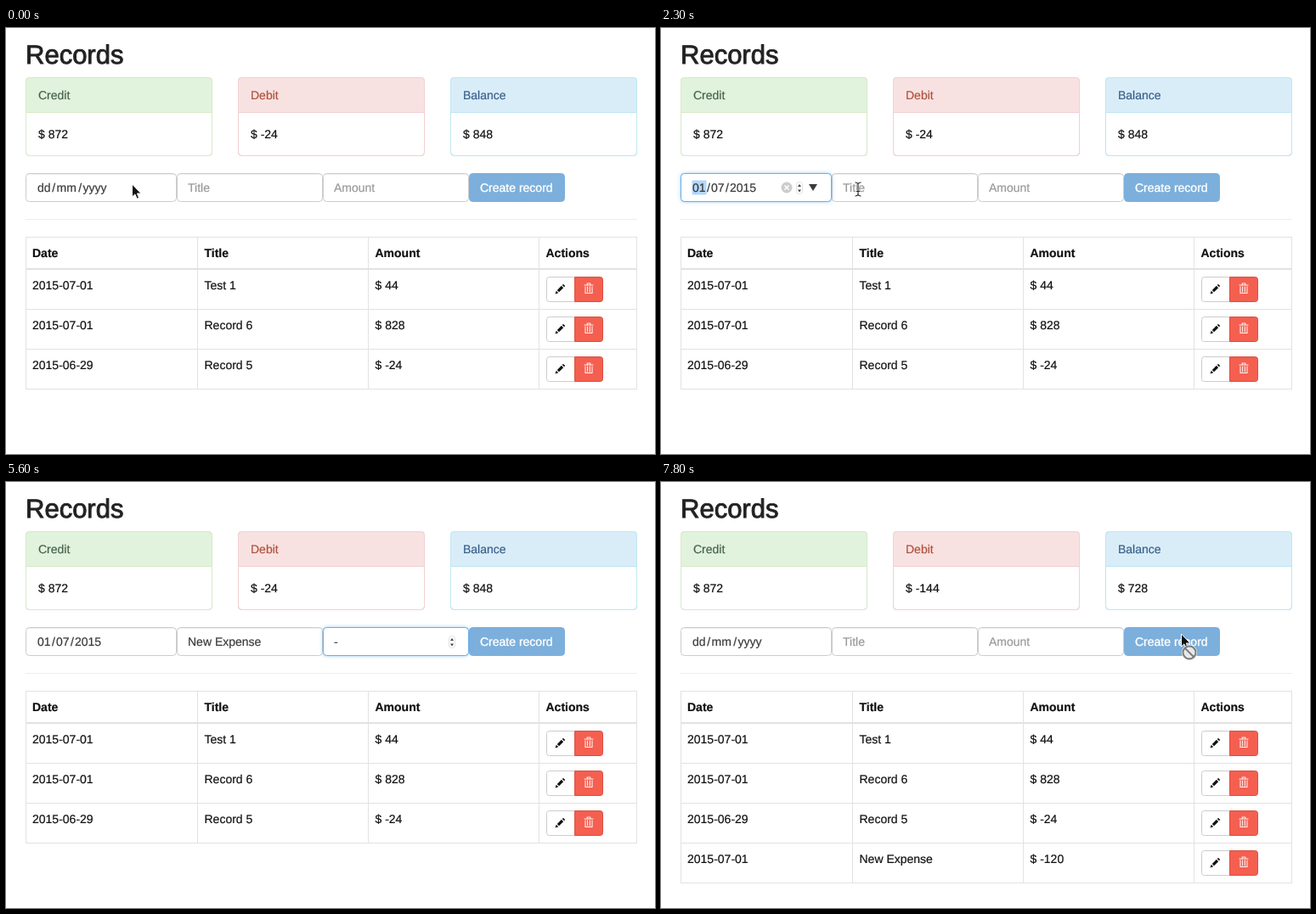
An HTML page that plays this animation: 764x502 px, repeating every 8000 ms.

```html
<!DOCTYPE html>
<html lang="en">
<head>
<meta charset="utf-8">
<title>Records</title>
<style>
  html, body { margin: 0; width: 100%; height: 100%; overflow: hidden; background: #fff; }
  svg { display: block; width: 764px; height: 502px; font: 14px "Liberation Sans", Arial, sans-serif; color: #111; text-rendering: geometricPrecision; }
  text { fill: currentColor; stroke: currentColor; stroke-width: .2px; }
  .heading { font-size: 31px; stroke-width: .9px; }
  .label { stroke-width: .35px; }
  .small { font-size: 13px; }
  .middle { text-anchor: middle; }
  .glow { filter: drop-shadow(0 0 2px rgba(102, 175, 233, .6)); }
  .popup { filter: drop-shadow(0 1px 1px rgba(0, 0, 0, .12)); }
</style>
</head>
<body>
<svg id="stage" viewBox="0 0 764 502"></svg>
<script>
const LOOP = 8000, STEP = 100;
const OPEN = 700, PICK = 1900, FOCUS_TITLE = 2500, FOCUS_AMOUNT = 4500, PRESS = 7400, CREATED = 7500;
const TITLE = { text: "New Expense", keys: [3000, 3100, 3200, 3300, 3500, 3700, 3800, 3900, 4000, 4100, 4200] };
const AMOUNT = { text: "-120", keys: [5100, 5700, 5900, 6100] };
const POINTER = [
  [0, 148, 184], [200, 160, 186], [400, 165, 187], [600, 179, 188], [900, 179, 188],
  [1200, 172, 232], [1600, 158, 281], [1900, 158, 281], [2300, 232, 190],
  [6700, 232, 190], [6900, 330, 166], [7100, 520, 163], [7300, 612, 179], [LOOP, 612, 179]
];

const stage = document.getElementById("stage");
const pen = document.createElement("canvas").getContext("2d");
pen.font = '14px "Liberation Sans", Arial, sans-serif';

const text = (x, y, s, attrs = "") => `<text x="${x}" y="${y}" ${attrs}>${s}</text>`;
const path = (d, attrs = "") => `<path d="${d}" ${attrs}/>`;
const box = (x, y, w, h, fill, stroke, r = 0, attrs = "") =>
  `<rect x="${x + .5}" y="${y + .5}" width="${w - 1}" height="${h - 1}" rx="${r}" fill="${fill}" stroke="${stroke}" ${attrs}/>`;
const at = (x, y, content) => `<g transform="translate(${x} ${y})">${content}</g>`;
const clamp = v => Math.max(0, Math.min(1, v));

function pointerAt(t) {
  const i = POINTER.findIndex(k => k[0] > t);
  const [t0, x0, y0] = POINTER[i - 1], [t1, x1, y1] = POINTER[i];
  const u = (t - t0) / (t1 - t0), e = u * u * (3 - 2 * u);
  return [x0 + (x1 - x0) * e, y0 + (y1 - y0) * e];
}

function panel(x, name, value, bg, border, color) {
  return box(x, 58, 220, 93, "#fff", border, 4) +
    path(`M${x} 100V62q0-4 4-4h212q4 0 4 4V100z`, `fill="${bg}"`) +
    path(`M${x} 99.5h220`, `stroke="${border}"`) +
    box(x, 58, 220, 93, "none", border, 4) +
    text(x + 15, 84, name, `color="${color}"`) + text(x + 15, 130, "$ " + value);
}

function tableRow(y, cells) {
  const pencil = path("M-2.6 2.6L2.5-2.5", 'stroke="#111" stroke-width="3.2"') +
    path("M3.4-3.4L4.6-4.6", 'stroke="#111" stroke-width="3.2"') +
    path("M-6 6L-4.8 2.2 -2.2 4.8z", 'fill="#111"');
  const trash = path("M-5.5-4h11M-1.8-4.5v-1.500h3.600v1.500M-4-2.500V5.500h8V-2.500M-1.400-2.500v7M1.400-2.500v7",
    'fill="none" stroke="#fff" stroke-width="1.1" opacity=".9"');
  return cells.map((s, i) => text([31, 233.5, 434.5][i], y + 24, s)).join("") +
    path(`M23 ${y + 47.5}h720`, 'stroke="#e2e2e2"') +
    box(636, y + 9, 36, 30, "#fff", "#ccc", 3) +
    path(`M669.5 ${y + 9.5}h30q3 0 3 3v23q0 3-3 3h-30z`, 'fill="#f45f50" stroke="#d9503f"') +
    at(652.5, y + 23.5, pencil) + at(686, y + 23, trash);
}

function table(rows) {
  const bottom = 284 + 47 * rows.length;
  return path("M23 246.5h720M23 283.5h720M23 284.5h720", 'stroke="#e2e2e2"') +
    ["Date", "Title", "Amount", "Actions"].map((s, i) =>
      text([31, 233.5, 434.5, 635.5][i], 270, s, 'font-weight="bold"')).join("") +
    rows.map((cells, i) => tableRow(284 + 47 * i, cells)).join("") +
    path([23, 225, 426, 627, 742].map(x => `M${x + .5} 246V${bottom}`).join(""), 'stroke="#e2e2e2"');
}

const field = (x, w) => box(x, 171, w, 34, "#fff", "#ccc", 4) +
  path(`M${x + 3} 172.5h${w - 6}`, 'stroke="#000" opacity=".06"');
const ring = (x, w, alpha) => alpha > 0
  ? box(x, 171, w, 34, "#fff", "#66afe9", 4, `class="glow" opacity="${alpha}"`) : "";
const spinner = x => box(x - 4, 181, 8, 15, "#fff", "#e2e2e2", 3) +
  path(`M${x - 2} 187l2-3 2 3zM${x - 2} 190.500l2 3 2-3z`, 'fill="#444"');

function dateField(t) {
  const filled = t >= PICK && t < CREATED, focused = t >= OPEN && t < FOCUS_TITLE;
  const parts = filled ? ["01", "/", "07", "/", "2015"] : ["dd", "/", "mm", "/", "yyyy"];
  const xs = filled ? [37, 54, 59, 76, 81] : [37, 54.3, 59.5, 85.3, 90.5];
  let s = focused ? box(36, 179, 18, 18, "#b3d7fd", "none") : "";
  s += parts.map((p, i) => text(xs[i], 193, p, 'color="#3a3a3a"')).join("");
  if (t >= 400 && t < FOCUS_TITLE) {
    s += spinner(163) + path("M174 184h10l-5 8z", 'fill="#3a3a3a"');
    if (filled) s += '<circle cx="148" cy="188" r="6.5" fill="#ccc"/>' +
      path("M145.5 185.5l5 5m0-5l-5 5", 'stroke="#fff" stroke-width="1.6"');
  }
  return s;
}

function typedField(x, placeholder, entry, focusFrom, focusTo, t) {
  const typed = t < CREATED ? entry.text.slice(0, entry.keys.filter(k => k <= t).length) : "";
  let s = typed ? text(x, 193, typed, 'color="#3a3a3a"') : text(x, 193, placeholder, 'color="#999"');
  const lastKey = Math.max(focusFrom, ...entry.keys.filter(k => k <= t));
  if (t >= focusFrom && t < focusTo && Math.floor((t - lastKey) / 500) % 2 === 0) {
    const cx = Math.round(x + pen.measureText(typed).width) + .5;
    s += path(`M${cx} 180v16`, 'stroke="#222"');
  }
  return s;
}

function form(t) {
  const fade = (from, to) => clamp((t - from + 60) / 200) * (t >= from) * (t < to ? 1 : clamp(1 - (t - to + 60) / 200));
  const enabled = t >= AMOUNT.keys[1] && t < CREATED, pressed = t >= PRESS && enabled;
  const [fill, edge] = !enabled ? ["#7cafdc", "#7cafdc"] : pressed ? ["#2765a5", "#1f5187"] : ["#2e7dc8", "#2b74bc"];
  return field(23, 178) + field(201, 172) + field(373, 172) +
    box(545, 171, 113, 34, fill, edge, 4) +
    text(558, 193, "Create record", 'color="#fff" class="label"') +
    ring(23, 178, fade(OPEN, FOCUS_TITLE)) +
    ring(201, 172, fade(FOCUS_TITLE, FOCUS_AMOUNT)) +
    ring(373, 172, fade(FOCUS_AMOUNT, PRESS)) +
    dateField(t) +
    typedField(214, "Title", TITLE, FOCUS_TITLE, FOCUS_AMOUNT, t) +
    typedField(386, "Amount", AMOUNT, FOCUS_AMOUNT, PRESS, t) +
    (t >= FOCUS_AMOUNT && t < PRESS ? spinner(525) : "");
}

function calendar(px, py) {
  const centered = 'class="small middle"';
  const col = Math.floor((px - 35) / 34), row = Math.floor((py - 276) / 20);
  let s = box(23, 205, 262, 183, "#fff", "#c6c6c6", 2, 'class="popup"') +
    text(39, 233, "July 2015", 'class="small"') + path("M99.5 227h7.5l-3.75 4.5z") +
    [194, 222, 250].map(x => box(x, 217, 24, 23, "url(#key)", "#b5b5b5", 2)).join("") +
    path("M208 225v7l-4-3.5zM260 225v7l4-3.5z", 'fill="#444"') +
    '<circle cx="234" cy="228.5" r="3" fill="#444"/>';
  if (col >= 0 && col < 7 && row >= 0 && row < 5)
    s += box(35 + 34 * col, 276 + 20 * row, 35, 20, "#e0ecfb", "none");
  s += box(171, 276, 34, 20, "none", "#bbb") +
    box(34, 250, 240, 127, "none", "#6fa6d0") + path("M35 275.5h238", 'stroke="#c4c4c4"');
  ["Sun", "Mon", "Tue", "Wed", "Thu", "Fri", "Sat"].forEach((d, i) => s += text(52 + 34 * i, 268.5, d, centered));
  for (let i = 0; i < 35; i++) {
    const day = i - 2, outside = day < 1 || day > 31;
    const label = day < 1 ? day + 30 : day > 31 ? day - 31 : day;
    s += text(52 + 34 * (i % 7), 290.5 + 20 * Math.floor(i / 7), label, centered + (outside ? ' color="#bbb"' : ""));
  }
  return s;
}

function cursor(t, x, y) {
  if (t >= 3000 && t < 6700) return "";
  const inForm = y >= 171 && y < 205;
  const arrow = path("M.5 0V15L3.9 11.9 6.2 17.2 8.6 16.2 6.3 11H11z", 'fill="#111" stroke="#fff"');
  if (inForm && x > 201 && x < 545) {
    const beam = "M-3.5-8q3.5 0 3.5 2.5V5.5q0 2.5-3.5 2.5M3.5-8q-3.5 0-3.5 2.5M0 5.5q0 2.5 3.5 2.5M-2 2.5h4";
    return at(x, y, path(beam, 'fill="none" stroke="#fff" stroke-width="2.4"') + path(beam, 'fill="none" stroke="#222" stroke-width="1.1"'));
  }
  if (inForm && x >= 545) {
    if (t < CREATED) return at(x, y, path("M0 1q1.5-2 3 0V7q4-.5 8 2v4l-2 4H1L-4 10q1-2 4 0z", 'fill="#fff" stroke="#111" stroke-width="1.1"'));
    const sign = '<circle r="7.5"/>' + path("M-5-5L5 5");
    return at(x, y, arrow + at(10, 22,
      `<g fill="#e6e8ea" stroke="#eee" stroke-width="3.4">${sign}</g><g fill="none" stroke="#7c7c7c" stroke-width="2">${sign}</g>`));
  }
  return at(x, y, arrow);
}

function scene(t) {
  const [x, y] = pointerAt(t), created = t >= CREATED;
  const rows = [["2015-07-01", "Test 1", "$ 44"], ["2015-07-01", "Record 6", "$ 828"], ["2015-06-29", "Record 5", "$ -24"]];
  if (created) rows.push(["2015-07-01", "New Expense", "$ -120"]);
  return '<defs><linearGradient id="key" x2="0" y2="1"><stop stop-color="#f8f8f8"/><stop offset="1" stop-color="#dcdcdc"/></linearGradient></defs>' +
    text(23, 42, "Records", 'class="heading" color="#222"') +
    panel(23, "Credit", 872, "#e1f3dd", "#d8e9c9", "#46604a") +
    panel(273, "Debit", created ? -144 : -24, "#f8e2e1", "#f2d0d2", "#b0533f") +
    panel(523, "Balance", created ? 728 : 848, "#d9edf9", "#bfe6f1", "#3a6088") +
    path("M23 225.5h720", 'stroke="#eee"') +
    table(rows) + form(t) +
    (t >= OPEN && t < PICK ? calendar(x, y) : "") +
    cursor(t, x, y);
}

let shown = -1;
function draw(now) {
  const t = Math.floor(now % LOOP / STEP) * STEP;
  if (t !== shown) stage.innerHTML = scene(shown = t);
  requestAnimationFrame(draw);
}
draw(0);
</script>
</body>
</html>
```
